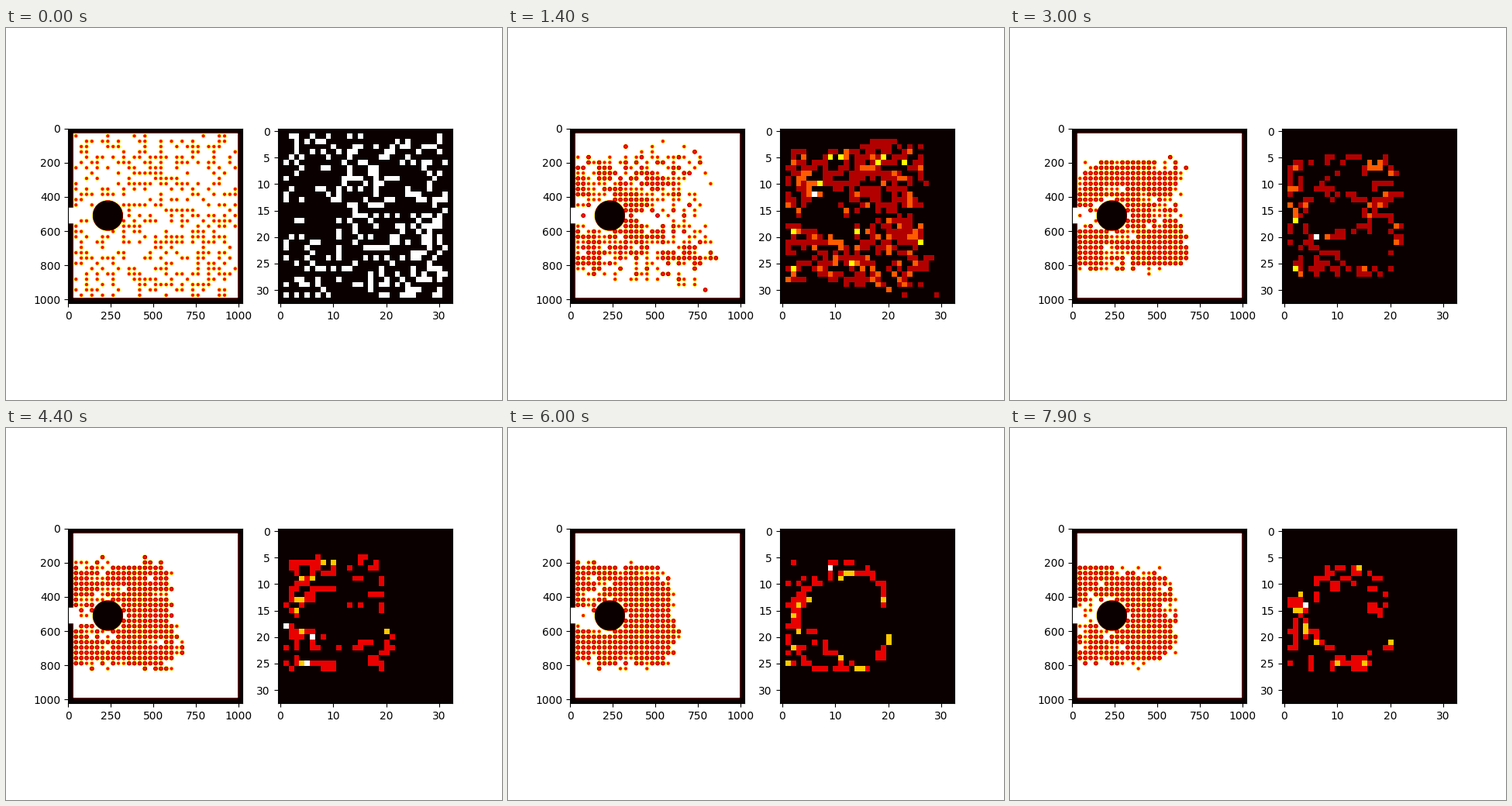
Write a matplotlib script that moves like this. It is 640 px wide and 480 px high and loops after 8000 ms.

```python
import math

import numpy as np
import matplotlib.pyplot as plt
from matplotlib.animation import FuncAnimation

N = 33            # cells per side
CELL = 31         # pixels per cell
FRAMES = 80
PEOPLE = 390
DOOR = slice(15, 18)
PILLAR = (16, 7)  # row, column
PULL = 1.6        # preference for cells nearer the door
STAY = 1.6        # weight of waiting
SIDESTEP = 0.45   # largest detour a person accepts
KEEP = 0.63       # share of the trace that survives a step
REACH = 3         # step length used when measuring distance

EMPTY, WALL, WAIT, MOVE = 0, -1, 1, 2
STEPS = ((0, -1), (0, 1), (-1, 0), (1, 0))


def make_room():
    room = np.full((N, N), EMPTY)
    room[[0, -1], :] = WALL
    room[:, [0, -1]] = WALL
    room[DOOR, 0] = EMPTY
    rows, cols = np.ogrid[:N, :N]
    room[(rows - PILLAR[0]) ** 2 + (cols - PILLAR[1]) ** 2 <= 9] = WALL
    return room


def door_distance(room):
    """Walking distance to the door, found by repeated relaxation."""
    dist = np.full((N, N), np.inf)
    dist[DOOR, 0] = 0
    span = range(-REACH, REACH + 1)
    moves = [(a, b) for a in span for b in span if math.gcd(a, b) == 1]
    for _ in range(50):
        pad = np.pad(dist, REACH, constant_values=np.inf)
        for a, b in moves:
            near = pad[REACH + a:REACH + a + N, REACH + b:REACH + b + N]
            dist = np.minimum(dist, near + math.hypot(a, b))
        dist[room == WALL] = np.inf
    dist[DOOR, 0] = -4
    return dist


def step(grid, trace, dist, rng):
    trace = rng.binomial(trace, KEEP)
    crowd = np.argwhere(grid > 0)
    # people near the door tend to go first
    turn = dist[crowd[:, 0], crowd[:, 1]] + rng.uniform(0, 4, len(crowd))
    grid[grid > 0] = WAIT
    for r, c in crowd[np.argsort(turn)]:
        cells, weights = [None], [STAY]
        for dr, dc in STEPS:
            spot = r + dr, c + dc
            rise = dist[spot] - dist[r, c]
            if grid[spot] == EMPTY and rise < SIDESTEP:
                cells.append(spot)
                weights.append(np.exp(-PULL * rise))
        edges = np.cumsum(weights)
        pick = cells[np.searchsorted(edges, rng.random() * edges[-1])]
        if pick is None:
            continue
        grid[r, c] = EMPTY
        if pick[1] > 0:
            grid[pick] = MOVE
            trace[r, c] += 1
    door = grid[DOOR, 1]
    door[(door > 0) & (rng.random(3) < 0.8)] = EMPTY
    return trace


def simulate():
    rng = np.random.default_rng(12)
    grid = make_room()
    dist = door_distance(grid)
    free = np.argwhere(grid[:, 1:] == EMPTY) + (0, 1)
    start = rng.choice(free, PEOPLE, replace=False)
    grid[start[:, 0], start[:, 1]] = WAIT
    trace = np.zeros((N, N), dtype=int)
    history = []
    for i in range(FRAMES):
        trace = step(grid, trace, dist, rng)
        if i == 0:
            grid[grid > 0] = MOVE
        history.append((grid.copy(), trace.copy()))
    return history


def make_backdrop():
    img = np.ones((N * CELL, N * CELL))
    img[:CELL] = img[-CELL:] = 0
    img[:, :CELL] = img[:, -CELL:] = 0
    img[DOOR.start * CELL:DOOR.stop * CELL, :CELL] = 1
    rows, cols = np.ogrid[:N * CELL, :N * CELL]
    cy, cx = (p * CELL + CELL // 2 for p in PILLAR)
    img[(rows - cy) ** 2 + (cols - cx) ** 2 <= 89 ** 2] = 0
    return img


def make_dot(rim, size):
    y, x = np.ogrid[:CELL, :CELL]
    radius = np.hypot(y - CELL // 2, x - CELL // 2)
    dot = np.ones((CELL, CELL))
    dot[radius <= size] = rim
    dot[radius <= 10] = 0.39
    return dot


HISTORY = simulate()
BACKDROP = make_backdrop()
DOTS = {WAIT: make_dot(0, 13), MOVE: make_dot(0.8, 12.5)}


def paint(grid):
    img = BACKDROP.copy()
    for r, c in np.argwhere(grid > 0):
        tile = img[r * CELL:(r + 1) * CELL, c * CELL:(c + 1) * CELL]
        np.minimum(tile, DOTS[grid[r, c]], out=tile)
    return img


fig, (left, right) = plt.subplots(1, 2, figsize=(6.4, 4.8), dpi=100)
room_view = left.imshow(BACKDROP, cmap="hot", vmin=0, vmax=1)
trace_view = right.imshow(HISTORY[0][1], cmap="hot", vmin=0, vmax=1)


def update(i):
    grid, trace = HISTORY[i]
    room_view.set_data(paint(grid))
    trace_view.set_data(trace)
    trace_view.set_clim(0, max(trace.max(), 1))
    return room_view, trace_view


anim = FuncAnimation(fig, update, frames=FRAMES, interval=100,
                     repeat=True, repeat_delay=0)
plt.show()
```
